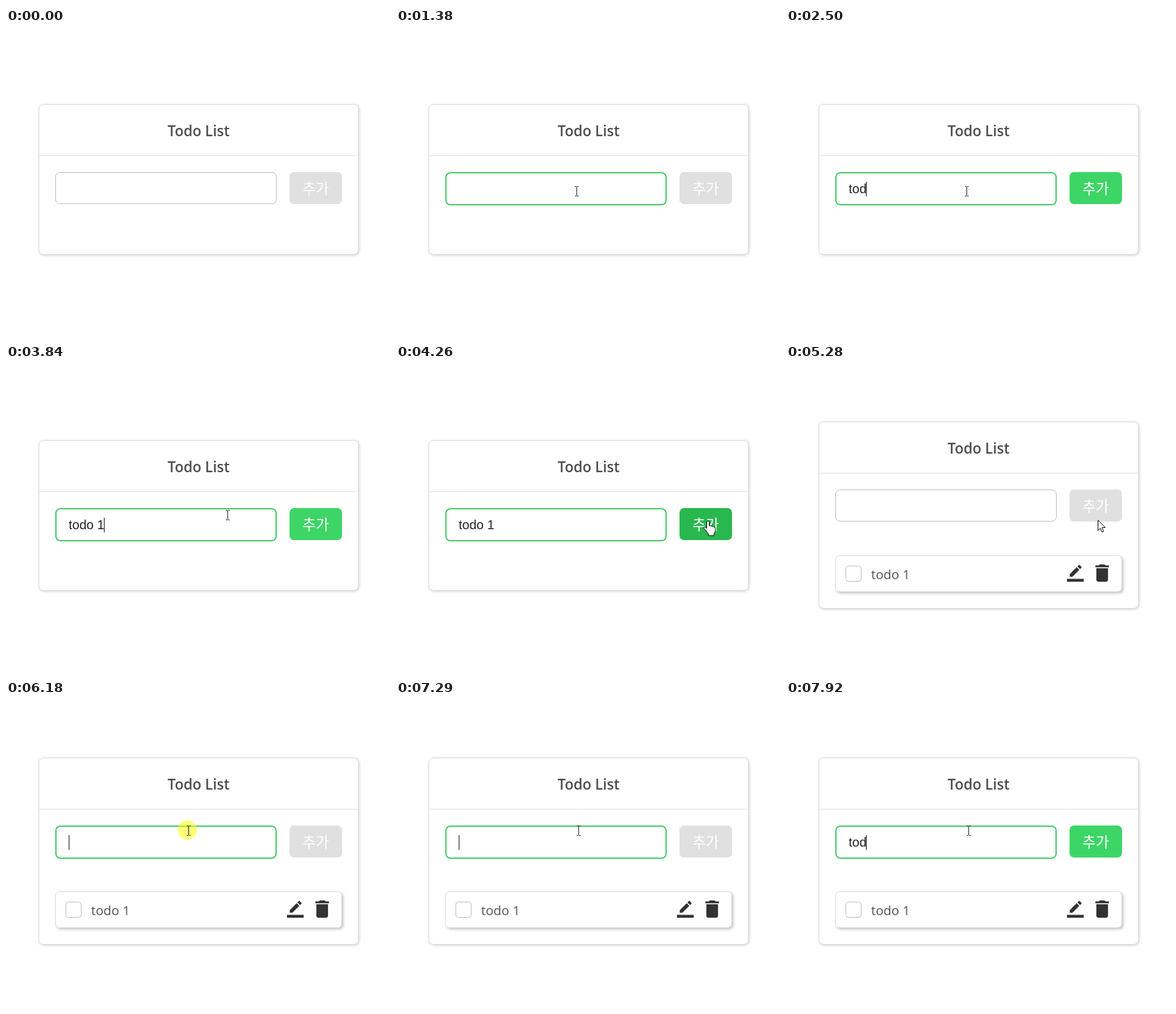
Animation of 600x481 px, one loop 7990 ms. Source, as an HTML page:

```html
<!DOCTYPE html>
<html lang="ko">
<head>
<meta charset="utf-8">
<title>Todo List</title>
<style>
  html, body { margin: 0; width: 100%; height: 100%; overflow: hidden; background: #fff; }
  svg { display: block; }
  .panel { fill: #fff; stroke: #ddd; }
  #card { filter: drop-shadow(1px 1px 2px rgba(0, 0, 0, .2)); }
  #item rect.panel { filter: drop-shadow(2px 2px 2px rgba(0, 0, 0, .25)); }
  #title { font: 600 22.5px "Open Sans", "Noto Sans", sans-serif; fill: #4d4d4d; }
  #label { font: 300 22.5px "Noto Sans CJK KR", "Noto Sans CJK", sans-serif; fill: #fff; }
  #typed { font: 20px "Liberation Sans", Arial, sans-serif; white-space: pre; }
  #item text { font: 20.2px "Open Sans", "Noto Sans", sans-serif; fill: #555; }
  .icon { fill: #333; }
  .pointer { fill: #fff; stroke: #000; stroke-linejoin: round; }
</style>
</head>
<body>
<svg width="600" height="481" viewBox="0 0 600 481">
  <rect id="card" class="panel" x="51.5" width="499" rx="7"/>
  <g id="form">
    <text id="title" x="301" y="169" text-anchor="middle">Todo List</text>
    <path d="M52 199.5H550" stroke="#e2e2e2"/>
    <rect id="input" fill="#fff" rx="7"/>
    <text id="typed"></text>
    <path id="caret" stroke="#111"/>
    <rect id="button" y="225" height="50" rx="7"/>
    <text id="label" x="484" y="259" text-anchor="middle">추가</text>
    <path id="spinner" d="M491 238a12 12 0 1 0 12 12" fill="none" stroke="#fff" stroke-width="3"/>
  </g>
  <g id="item">
    <rect class="panel" x="77.5" y="299.5" width="447" height="56" rx="6"/>
    <rect x="93.5" y="315.5" width="24" height="24" rx="4" fill="#fff" stroke="#bbb"/>
    <text x="133" y="336">todo 1</text>
    <path class="icon" transform="translate(439 313.8) scale(1.09)"
      d="M17.75 7 14 3.25l-10 10V17h3.75l10-10zm2.96-2.96a1 1 0 0 0 0-1.41L18.37.29a1 1 0 0 0-1.41 0L15 2.25 18.75 6zM0 20h24v4H0z"/>
    <path class="icon" transform="translate(475.8 308.5) scale(1.52 1.5)"
      d="M6 19c0 1.1.9 2 2 2h8c1.1 0 2-.9 2-2V7H6zM19 4h-3.5l-1-1h-5l-1 1H5v2h14z"/>
  </g>
  <g id="cursor">
    <circle id="press" cx="-2" cy="-1" r="15" fill="#ff0" opacity=".52"/>
    <path id="beam" d="M-3-7.5h2l1 .7 1-.7h2M-3 7.5h2l1-.7 1 .7h2M0-7V7" fill="none" stroke="#222"/>
    <path id="arrow" class="pointer" d="M0 0v16l3.7-3.6 2.6 6 2.5-1.1-2.6-5.9h5.3z"/>
    <path id="hand" class="pointer"
      d="M-2 2a2 2 0 0 1 4 0v6q2.5-1.5 3.5.5 2.5-1 3.5 1 2.5-.5 2.5 2.5v4l-2 4v3h-9v-3l-4-5-3-3.5q-.5-2 1.5-2l3 2z"/>
  </g>
</svg>
<script>
const DURATION = 7990;
const ADDED = 4940;        // the item joins the list
const SUBMITTED = 4670;    // loading starts

// [time, x, y]
const moves = [
  [260, 369, 424], [330, 345, 370], [400, 318, 318], [470, 297, 278], [540, 287, 262],
  [820, 285, 262], [960, 283, 257], [1100, 282, 255],
  [3840, 346, 236], [3910, 400, 232], [3980, 440, 235], [4050, 465, 239],
  [4120, 478, 242], [4190, 485, 244], [4260, 487, 245], [5280, 487, 244],
  [5630, 440, 236], [5700, 380, 226], [5770, 330, 214], [5840, 298, 207], [5900, 285, 204]
];

// [time, input value]; an empty value is a fresh focus
const edits = [
  [820, ""], [1800, "t"], [1940, "to"], [2500, "tod"], [2570, "todo"], [2710, "todo "],
  [3420, "todo 1"], [ADDED, ""], [6180, ""], [7640, "t"], [7780, "to"], [7920, "tod"]
];

const presses = [[820, 960], [4530, 4670], [6180, 6240]];

const $ = id => document.getElementById(id);
const within = (t, [from, to]) => t >= from && t < to;
const latest = (list, t) => list.findLast(entry => entry[0] <= t);

function set(id, attributes) {
  for (const [name, value] of Object.entries(attributes)) $(id).setAttribute(name, value);
}

function show(id, visible) {
  $(id).style.display = visible ? "" : "none";
}

function drawForm(t, x) {
  const added = t >= ADDED;
  const loading = within(t, [SUBMITTED, ADDED]);
  const focused = within(t, [820, SUBMITTED]) || t >= 6180;
  const [editTime, value] = latest(edits, t) || [0, ""];

  set("card", added ? { y: 90.5, height: 291 } : { y: 119.5, height: 234 });
  set("form", { transform: `translate(0 ${added ? -29 : 0})` });
  show("item", added);

  const right = loading ? 435 : 423;
  const line = focused ? 2 : 1;
  set("input", {
    x: 77 + line / 2, y: 225 + line / 2,
    width: right - 77 - line, height: focused ? 50 : 49,
    stroke: focused ? "#45cb69" : "#bbb", "stroke-width": line
  });

  const textX = 96 + line;
  $("typed").textContent = value;
  set("typed", { x: textX, y: 256 + line, fill: loading ? "#444" : "#222" });

  const caretX = Math.floor(textX + (value ? $("typed").getComputedTextLength() : 0)) + 0.5;
  set("caret", { d: `M${caretX} 240V263` });
  show("caret", focused && (t - editTime) % 1110 < 550);

  const hovered = x >= 443;
  set("button", {
    x: right + 20, width: 82 - (right - 423),
    fill: !value ? "#e0e0e0" : hovered ? "#29b84f" : "#3dd666"
  });
  show("label", !loading);
  show("spinner", loading);
  set("spinner", { transform: `rotate(${(t - 4870) * 0.36} 491 250)` });
}

function drawCursor(t, x, y) {
  const top = t >= ADDED ? 196 : 225;
  const overInput = x > 77 && x < 423 && y > top && y < top + 51;
  const overButton = x >= 443 && t < 5280;
  show("cursor", t >= moves[0][0]);
  set("cursor", { transform: `translate(${x + 0.5} ${y})` });
  show("beam", overInput);
  show("hand", overButton);
  show("arrow", !overInput && !overButton);
  show("press", presses.some(span => within(t, span)));
}

const start = performance.now();

function draw() {
  const t = (performance.now() - start) % DURATION;
  const [, x, y] = latest(moves, t) || [0, 0, 0];
  drawForm(t, x);
  drawCursor(t, x, y);
  requestAnimationFrame(draw);
}

draw();
</script>
</body>
</html>
```
